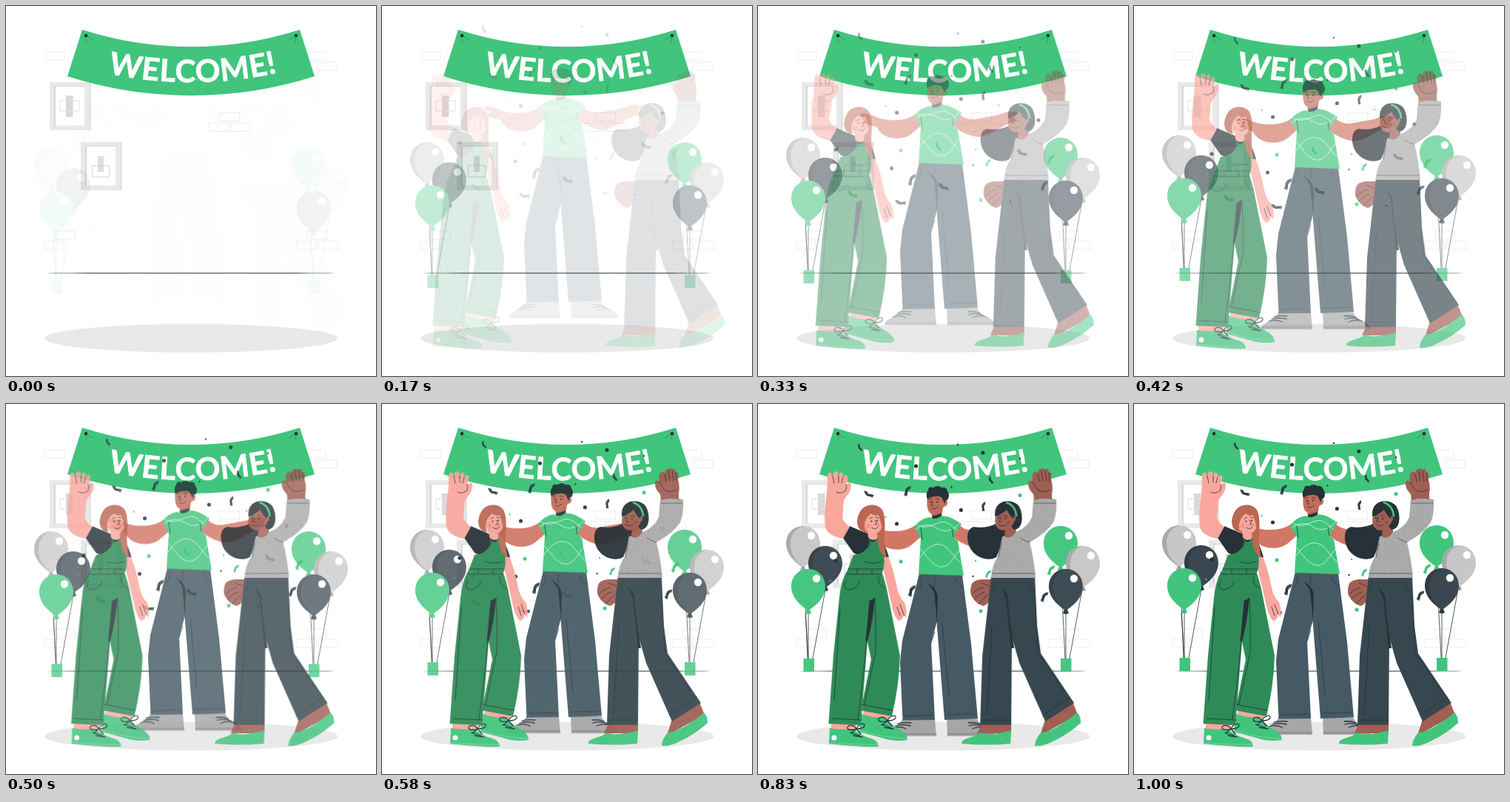
Recreate the animation shown at these times as an HTML page without scripts. Size 500x500 px, loop 1.04 s.

```html
<!DOCTYPE html>
<html lang="en">
<head>
<meta charset="utf-8">
<title>Welcome</title>
<style>
html, body { margin: 0; width: 100%; height: 100%; overflow: hidden; background: #fff; }
svg { display: block; width: 100vw; height: 100vh; }

.rise { animation: rise 1040ms infinite; }
.slide { animation: slide 1040ms infinite; }
.down { --x: 0px; --y: -29.86px; }
.right { --x: -29.86px; --y: 0px; }
.left { --x: 29.86px; --y: 0px; }

@keyframes rise {
  from { opacity: .065; transform: translateY(28.06px); animation-timing-function: cubic-bezier(.143, .237, .631, 1); }
  92.3%, to { opacity: 1; transform: translateY(0); }
}
@keyframes slide {
  from { opacity: .005; transform: translate(var(--x), var(--y)); animation-timing-function: cubic-bezier(.345, .089, .499, 1.367); }
  92.3%, to { opacity: 1; transform: translate(0, 0); }
}

.ink { fill: #263238; }
.line { fill: none; stroke: #263238; stroke-width: .8; stroke-linecap: round; stroke-linejoin: round; }
.lace { stroke-width: 1.3; }
.green { fill: #41c57d; color: #41c57d; }
.grey { color: #c7c7c7; }
.dark { color: #3a4750; }
.wall { fill: none; stroke: #e9e9e9; stroke-width: .8; }
.tan { fill: #d17766; }
.rose { fill: #f9a79d; }
.brown { fill: #a05f53; }
.title {
  font: 700 42px Lato, "Open Sans", sans-serif; letter-spacing: .7px;
  fill: #fff; stroke: #fff; stroke-width: .8; text-anchor: middle;
}
</style>
</head>
<body>
<svg viewBox="0 0 500 500">
<defs>
  <path id="arc" d="M110 84.2A530 530 0 0 0 390 84.2"/>
  <rect id="brick" width="26.5" height="11"/>
  <g id="balloon">
    <path fill="currentColor" d="M0 0C13 0 23 10 23 24C23 38 11 49 2 55L4 60Q0 62-4 60L-2 55C-11 49-23 38-23 24C-23 10-13 0 0 0Z"/>
    <path fill-opacity=".15" d="M0 0C-13 0-23 10-23 24C-23 38-11 49-2 55L-1 55C-11 46-17 37-17 24C-17 12-10 3 0 0Z"/>
    <path fill-opacity=".2" d="M-2 55H2L4 60Q0 62-4 60Z"/>
    <circle cx="11" cy="13" r="5.2" fill="#fff"/>
  </g>
  <g id="ribbon">
    <path fill="currentColor" d="M-7-5L-3-4Q-2-1 1 0Q4 0 7 1L5 5Q2 3-1 3Q-6 2-7-5Z"/>
    <path fill-opacity=".35" d="M-3 2Q-1 0 3 0L4 2Q0 2-3 2Z"/>
  </g>
  <g id="bow" class="line lace">
    <path d="M0 0C-4-7-13-5-12-1C-11 2-4 2 0 0C3-7 12-9 11-4C10-1 4 0 0 0L-7 6M0 0L6 7M-8 5L4 9M-4 9L8 11"/>
  </g>
  <path id="shirt" d="M232 151Q240 156 248 149Q259 150 265 154L275 160L264 178L270 183L278 230L217 228L220 180L211 164Q219 153 232 151Z"/>
  <clipPath id="inShirt"><use href="#shirt"/></clipPath>
  <pattern id="wool" width="17" height="19" patternUnits="userSpaceOnUse">
    <path fill="#a9a9a9" d="M0 0H17V19H0Z"/>
    <path stroke="#d4d4d4" stroke-width="1" stroke-linecap="round" d="M3 4h.1M11 2h.1M7 10h.1M14 13h.1M3 16h.1"/>
  </pattern>
</defs>

<!-- room -->
<ellipse cx="250" cy="449" rx="198" ry="19.3" fill="#e9e9e9"/>
<g class="wall">
  <use href="#brick" x="52" y="62"/><use href="#brick" x="405.5" y="62"/><use href="#brick" x="420.5" y="76"/>
  <use href="#brick" x="289" y="144.5"/><use href="#brick" x="274" y="158.5"/><use href="#brick" x="303.5" y="158.5"/>
  <use href="#brick" x="66" y="304"/><use href="#brick" x="52" y="318"/>
  <use href="#brick" x="407" y="304"/><use href="#brick" x="393" y="318"/><use href="#brick" x="422" y="318"/>
</g>
<g id="pictures">
  <path fill="#e9e9e9" d="M59 103H114V168H59Z"/>
  <path fill="#d8d8d8" d="M113 103H114.5V168H113ZM65 108H107V109H67V162H65Z"/>
  <path fill="#fff" d="M67 109H106V161.5H67Z"/>
  <path fill="#d9d9d9" d="M81 121H90.5V150H81Z"/>
  <path fill="none" stroke="#dfdfdf" d="M73 128H99V142H73Z"/>
  <path fill="#e9e9e9" d="M101 184H156V249H101Z"/>
  <path fill="#d8d8d8" d="M155 184H156.5V249H155ZM107 189H149V190H109V243H107Z"/>
  <path fill="#fff" d="M109 190H148V242.5H109Z"/>
  <path fill="#dedede" d="M124 203H132V224H124Z"/>
  <path fill="none" stroke="#d6d6d6" d="M116.5 216H139.5V231H116.5Z"/>
</g>
<ellipse class="ink" cx="250" cy="361" rx="200" ry=".6"/>

<!-- banner -->
<path class="green" d="M103 32A481 481 0 0 0 397 32L417 95A549 549 0 0 1 83 95Z"/>
<path class="line" stroke-width=".5" opacity=".4" d="M108 41L109 50M109 41L118 46M392 41L391 50M391 41L382 46"/>
<circle class="ink" cx="108" cy="40" r="2.3"/><circle class="ink" cx="392" cy="40" r="2.3"/>
<text class="title"><textPath href="#arc" startOffset="51%">WELCOME!</textPath></text>

<!-- balloons -->
<g class="rise">
  <path class="line" d="M62 222L67 343M64 282L68 343M68 282V343M91 250L74 343M409 222L415 343M416 282V343M438 250L421 343"/>
  <use href="#balloon" class="grey" x="61" y="164"/>
  <use href="#balloon" class="dark" x="91" y="191"/>
  <use href="#balloon" class="green" x="68" y="222"/>
  <use href="#balloon" class="green" x="409" y="164"/>
  <use href="#balloon" class="grey" x="439" y="191"/>
  <use href="#balloon" class="dark" x="416" y="222"/>
  <path class="green" d="M61.5 343H76V361H61.5ZM409 343H423.5V361H409Z"/>
</g>

<!-- confetti -->
<g class="slide down">
  <g fill="none" stroke="#263238" stroke-linecap="round">
    <path stroke-width="5" d="M303.8 64h.1M213.5 82h.1M187.5 160h.1M274.3 141.500h.1M105 210h.1M180.5 235h.1M379 170h.1"/>
    <path stroke-width="2.3" d="M270 53h.1M354 72h.1M261.5 110.500h.1M290.5 231h.1M341 280h.1"/>
    <path stroke="#41c57d" stroke-width="5" d="M354 121.500h.1M193 211h.1M301 278h.1"/>
    <path stroke="#41c57d" stroke-width="2.3" d="M172.5 151h.1M294 210h.1M97.5 237h.1M325 150h.1"/>
  </g>
  <g color="#37474f">
    <use href="#ribbon" transform="translate(138 57) rotate(35) scale(.7)"/>
    <use href="#ribbon" transform="translate(150 120) scale(.95)"/>
    <use href="#ribbon" transform="translate(202 116) rotate(90)"/>
    <use href="#ribbon" transform="translate(305 137) rotate(70) scale(.85)"/>
    <use href="#ribbon" transform="translate(315 101) rotate(35) scale(.75)"/>
    <use href="#ribbon" transform="translate(208 251) rotate(88) scale(1.1)"/>
    <use href="#ribbon" transform="translate(387 259) rotate(95)"/>
    <use href="#ribbon" transform="translate(193 281) rotate(-15)"/>
    <use href="#ribbon" transform="translate(251 260)"/>
    <use href="#ribbon" transform="translate(357 214)"/>
  </g>
  <g class="green">
    <use href="#ribbon" transform="translate(396 223) rotate(95)"/>
    <use href="#ribbon" transform="translate(311 228) rotate(95) scale(.75)"/>
    <use href="#ribbon" transform="translate(128 270)"/>
    <use href="#ribbon" transform="translate(244 206) rotate(30) scale(.8)"/>
  </g>
</g>

<!-- man -->
<g class="slide down">
  <path class="tan" d="M214 161Q203 170 184 170Q168 170 158 165Q146 159 138 162Q139 166 146 168Q140 172 144 175L160 179Q166 191 180 194Q196 197 207 189L222 176Z"/>
  <path class="tan" d="M270 160Q282 172 297 168L325 163Q340 156 351 160Q352 163 345 166Q352 169 348 172L333 177Q312 191 298 193Q280 191 264 178Z"/>
  <path fill="#a6a6a6" d="M195 424H239L241 447H171Q172 440 183 436Q193 431 195 424ZM255 424H296Q300 432 309 435Q319 440 319 447H256Z"/>
  <path class="line" stroke-width=".6" opacity=".5" d="M172 444H241M256 444H319"/>
  <path class="line lace" d="M189 430Q196 428 207 429M186 433Q195 430 206 433M182 436Q192 433 200 437M284 429Q294 428 300 431M285 433Q295 430 304 434M290 437Q299 433 308 436"/>
  <path fill="#455a64" d="M218 227L276 229L288 322L297 423.5L252 425L241.500 293L234 321L239 425L195.500 425.500L192 347L195 318Z"/>
  <path class="ink" d="M230 240Q238 246 241 251L243 258L242 293L238 252Z"/>
  <path class="line" opacity=".8" d="M239 231L238 246Q233 246 230 240M221 232Q222 244 216 248M267 234Q270 244 278 246M199 420L236 419M254 418L294 417M258 392L249 294M234 321L239 306"/>
  <path fill="#b96654" d="M234 140L235 154Q243 157 248 150L250 138Z"/>
  <path class="ink" d="M235 150L248 146V150Q240 157 235 152Z"/>
  <use href="#shirt" class="green"/>
  <g clip-path="url(#inShirt)" fill="none" stroke="#fff" stroke-width=".8" stroke-opacity=".85">
    <path d="M215 190C227 200 236 220 250 218S267 194 282 189M215 212C226 192 240 183 252 190S268 214 282 216M206 174C222 158 232 160 242 166S262 172 278 154M214 160C226 172 244 154 254 158S268 170 276 174"/>
  </g>
  <path class="line" d="M220 165L222 181M264 178L262 166"/>
  <path fill="#c26c5a" d="M229 121Q227 138 231 144Q235 149 242 145Q249 142 251 137Q257 136 256 129L251 128V119Z"/>
  <path class="ink" d="M229 127Q226 118 230 115Q230 109 237 111Q243 107 248 111Q255 110 256 116Q260 121 256 128Q254 127 252 133L249 126Q247 122 240 123Q233 123 229 127Z"/>
  <path class="line" d="M231 127L235 126M240 126L245 127M236 130L234 135H237M234 139Q238 142 243 137"/>
  <circle class="ink" cx="233.5" cy="130.5" r="1.1"/><circle class="ink" cx="242" cy="130.5" r="1.1"/>
</g>

<!-- woman on the left -->
<g class="slide right">
  <path class="rose" d="M97 428L131 430L130 441L97 441ZM141 412L177 418L174 428L139 424Z"/>
  <path class="green" d="M138 419Q152 424 170 424Q178 434 190 440Q200 446 200 454Q182 457 165 451L135 443Z"/>
  <path class="green" d="M95 438Q110 441 126 439Q137 448 151 452Q161 455 161 463Q140 464 94 459Z"/>
  <path fill="none" stroke="#fff" stroke-opacity=".35" stroke-width=".7" d="M95 457Q130 461 160 460M136 441Q170 452 199 452"/>
  <circle cx="101" cy="451" r="3.5" fill="#fff"/>
  <use href="#bow" x="131" y="439"/><use href="#bow" x="173" y="428"/>
  <path class="rose" d="M163 194L173 203Q182 226 185 244Q188 261 196 268Q200 278 198 289L195 284Q194 292 188 293Q183 288 180 277L174 251L165 214Z"/>
  <path class="line" d="M186 274L190 286M190 271L195 284"/>
  <path fill="#2e8b57" d="M118 226H165Q171 242 174 260L190 340Q189 380 179 422L137 414L151 345L146 321L137 434L93.5 432L100 340L108 262Q110 240 118 226Z"/>
  <path class="ink" d="M149 266L156 262Q153 296 146 321L143.5 320Z"/>
  <path class="line" d="M98 425L138 427M138 406L180 414M149 266Q144 345 133 426M156 262Q158 305 157 335L142 406M118 238Q110 250 123 251Q134 248 135 240M161 234Q160 246 170 249M109 275L101 400"/>
  <path class="ink" d="M122 165L113 181L127 201Q136 208 146 199L158 184L165 186L168 206L175 207Q170 190 164 181L148 176Z"/>
  <path fill="#2e8b57" d="M146 176Q151 183 146 194Q140 203 127 204L117 230H165Q173 215 164 185L157 181Q158 188 151 186Z"/>
  <path class="line" d="M120 223H166M118 230H165M132 223V229M152 223V229M142 213Q153 217 165 213M149 178Q152 183 147 194"/>
  <path class="rose" d="M92 108Q91 98 93 94Q96 90 99 97Q100 90 104 91Q107 92 107 97Q109 91 112 93Q114 95 113 99Q117 94 119 97Q120 102 117 109Q123 104 124 109Q124 116 120 122Q116 127 114 130L112 154Q115 161 122 166L113 182Q92 178 89 166Q87 152 90 130Z"/>
  <path class="line" d="M99 97L101 107M107 97V106M113 99L111 107M117 109Q119 111 116 118M104 119Q109 122 115 118"/>
  <path class="rose" d="M146 166L147 180Q153 187 160 181L160 168Z"/>
  <path fill="#bb6753" d="M133 160Q133 143 144 138Q158 133 166 143Q170 150 169 172Q168 190 172 208Q162 202 160 188L158 160Z"/>
  <path class="rose" d="M140 158Q140 148 150 148L164 147Q169 161 164 170Q158 178 150 175Q141 170 140 158Z"/>
  <path fill="#bb6753" d="M151 148Q143 154 142 163Q142 169 144 173Q132 172 132 158Q134 142 147 138Q161 135 168 149Q171 160 168 184Q165 160 161 150Q155 152 151 148Z"/>
  <g fill="#f28278" fill-opacity=".5"><circle cx="147" cy="165" r="2.8"/><circle cx="161" cy="164" r="2.3"/></g>
  <path class="line" d="M149 155L153 153M157 153L161 154M156 157L159 162L156 163M152 167Q157 171 160 166"/>
  <circle class="ink" cx="151.5" cy="158.500" r="1.1"/><circle class="ink" cx="159" cy="157.500" r="1.1"/>
</g>

<!-- woman on the right -->
<g class="slide left">
  <path class="brown" d="M322 237L303 237Q292 238 290 245Q287 256 292 262Q297 270 306 273Q312 271 315 265L322 256Z"/>
  <path class="line" d="M291 257Q299 249 306 248M294 264Q301 256 308 254M300 270Q306 264 312 258M304 242L314 246"/>
  <path class="brown" d="M305 430H344V445H298ZM390 426L426 400L434 420L383 448Z"/>
  <path class="green" d="M277 459Q276 454 287 451Q296 449 302 444Q313 450 344 441L343 459Q310 462 277 459ZM376 462Q376 454 384 444Q400 444 433 417Q438 421 438 431Q420 447 402 455Q388 463 376 462Z"/>
  <path fill="#37474f" d="M317 232L376 234L379 300L384 337L429 404L390 429L355 350L345 315L344 433.5L302 433.5L305 340Z"/>
  <path class="ink" d="M330 246L337 263L344 330L348 330L341 285L339 258Z"/>
  <path class="line" d="M306 427H342M386 421L423 396M370 240Q364 246 375 252M322 240Q321 250 317 253M311 420L318 300M376 262L380 336L416 389"/>
  <path class="ink" d="M325 161Q310 169 293 166Q284 169 285 183Q287 201 304 208Q316 212 324 207Q329 196 334 183L342 170Z"/>
  <path fill="url(#wool)" d="M332 179Q341 177 350 173Q366 167 372 153L374 129Q388 125 405 129Q406 150 401 160Q392 174 369 187Q375 211 377 235H317Q317 220 326 206Q329 192 332 179Z"/>
  <path class="line" opacity=".7" d="M369 187Q361 185 356 181M318 229H376M375 134H404M331 188L327 207"/>
  <path class="brown" d="M375 130L374 122Q366 114 367 106Q369 101 373 105Q371 95 375 92Q378 89 380 94Q381 86 385 88Q388 85 390 89Q394 85 395 92Q400 91 398 102Q401 112 399 121L399 129Q388 126 375 130Z"/>
  <path class="line" d="M380 94L382 105M385 90L387 104M390 90L392 104M395 93L396 104M373 105Q377 113 380 116Q387 121 396 116"/>
  <path class="brown" d="M336 166L335 179Q343 184 350 173L349 160Z"/>
  <path class="ink" d="M323 150Q322 136 333 132Q348 129 355 139Q360 149 358 160Q356 169 348 170L340 160Z"/>
  <path class="brown" d="M324 146Q321 157 323 164Q328 173 337 170Q345 167 348 159Q352 155 349 150L340 141Z"/>
  <path class="ink" d="M322 152Q321 140 328 135Q341 130 350 142L351 154Q347 148 347 155Q342 151 338 143Q331 149 322 152Z"/>
  <path fill="none" stroke="#41c57d" stroke-width="2.8" d="M337 133Q350 137 351 152"/>
  <path class="line" d="M325 151L329 150M334 151L339 152M330 153L328 159H331M327 163Q332 167 337 163"/>
  <circle class="ink" cx="327" cy="154" r="1.1"/><circle class="ink" cx="336" cy="155" r="1.1"/>
  <circle cx="341" cy="160" r="2.5" fill="#8a463c" fill-opacity=".45"/>
</g>
</svg>
</body>
</html>
```
